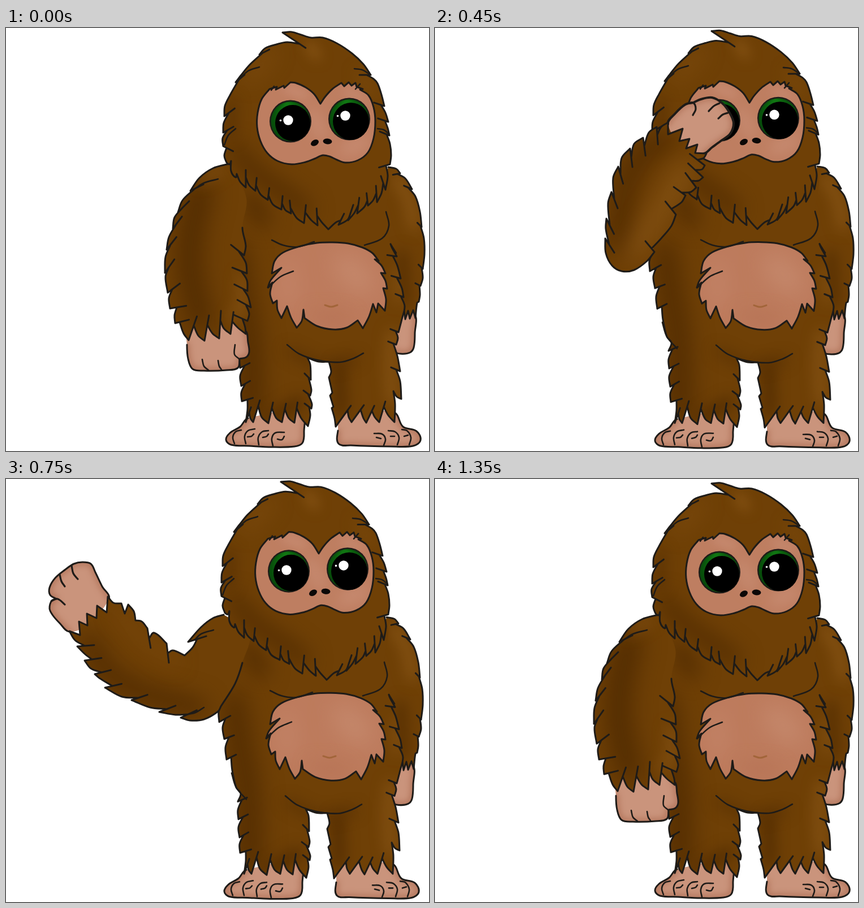
Animation, 748 px wide and 748 px high, one loop 1.5 s. Source, as an HTML page with a canvas:

```html
<!DOCTYPE html>
<html lang="en">
<head>
<meta charset="utf-8">
<title>Waving ape</title>
<style>
html, body { margin: 0; width: 100%; height: 100%; overflow: hidden; background: #fff; }
canvas { display: block; }
</style>
</head>
<body>
<canvas id="stage" width="748" height="748"></canvas>
<script>
const ctx = document.getElementById('stage').getContext('2d');
const INK = '#1e1b18', FUR = '#6f4006', DARK = '#4c2800', LIGHT = '#8f5b1b';
const SKIN = '#ca947c', FACE = '#be7e61', RIM = '#a9694f', GLOW = '#cc927a';

// Points are "x,y"; "!" makes a corner, "-" hides the line that leaves the point.
function outline(spec, closed, tick = 0) {
  const pts = spec.trim().split(/\s+/).map(s => {
    const [x, y] = s.split(',').map(parseFloat);
    return { x, y, sharp: s.includes('!'), hidden: s.includes('-') };
  });
  const n = pts.length;
  const at = i => closed ? pts[(i + n) % n] : pts[Math.max(0, Math.min(n - 1, i))];
  const handle = (i, other, sign) => {
    const p = at(i);
    if (p.sharp) return [p.x + (other.x - p.x) / 3, p.y + (other.y - p.y) / 3];
    const a = at(i - 1), b = at(i + 1);
    const k = sign * Math.hypot(other.x - p.x, other.y - p.y) / 3 / (Math.hypot(b.x - a.x, b.y - a.y) || 1);
    return [p.x + (b.x - a.x) * k, p.y + (b.y - a.y) * k];
  };
  const fill = new Path2D(), line = new Path2D();
  fill.moveTo(pts[0].x, pts[0].y);
  line.moveTo(pts[0].x, pts[0].y);
  for (let i = 0; i < (closed ? n : n - 1); i++) {
    const p = at(i), q = at(i + 1);
    const curve = [...handle(i, q, 1), ...handle(i + 1, p, -1), q.x, q.y];
    fill.bezierCurveTo(...curve);
    if (p.hidden) line.moveTo(q.x, q.y);
    else line.bezierCurveTo(...curve);
  }
  // Between tufts the line runs on into the fur.
  if (tick) pts.forEach((p, i) => {
    const a = at(i - 1), b = at(i + 1);
    const hollow = (p.x - a.x) * (b.y - p.y) < (p.y - a.y) * (b.x - p.x);
    if (!p.sharp || !hollow || a.sharp === b.sharp) return;
    const tip = a.sharp ? a : b;
    const k = tick / Math.hypot(p.x - tip.x, p.y - tip.y);
    line.moveTo(p.x, p.y);
    line.lineTo(p.x + (p.x - tip.x) * k, p.y + (p.y - tip.y) * k);
  });
  return { fill, line };
}

function ink(path, width = 3, color = INK) {
  ctx.lineWidth = width;
  ctx.strokeStyle = color;
  ctx.stroke(path);
}

function lines(list, width = 2.6, color = INK) {
  list.split('|').forEach(s => ink(outline(s).line, width, color));
}

// Only the blurred shadow of the stroke lands on the stage.
function soften(path, width, color, blur) {
  ctx.save();
  const m = ctx.getTransform();
  m.e -= 2000;
  ctx.setTransform(m);
  ctx.shadowOffsetX = 2000;
  ctx.shadowBlur = blur;
  ctx.shadowColor = color;
  ink(path, width, '#000');
  ctx.restore();
}

function part(spec, fill, { tick = 0, rim, soft = [], width = 3 } = {}) {
  const shape = outline(spec, true, tick);
  ctx.fillStyle = fill;
  ctx.fill(shape.fill);
  ctx.save();
  ctx.clip(shape.fill);
  soft.forEach(([s, w, color, blur = 26]) => soften(outline(s).line, w, color, blur));
  if (rim) soften(shape.line, 7, rim, 12);
  ctx.restore();
  ink(shape.line, width);
}

function dot(x, y, rx, ry, color, turn = 0) {
  ctx.fillStyle = color;
  ctx.beginPath();
  ctx.ellipse(x, y, rx, ry, turn, 0, 7);
  ctx.fill();
}

const skin = (spec, width) => part(spec, SKIN, { rim: RIM, width });
const fur = (spec, soft, tick = 17) => part(spec, FUR, { tick, soft });

function drawBody() {
  skin('694,500- 722,505 723,540 721,565 714,574 698,576 688,572-');
  skin('428,690 414,705 396,716 389,728 398,737 430,739 470,741 510,740 524,734 527,715 522,680-');
  skin('594,680- 587,712 588,735 610,738 680,740 720,739 733,729 726,713 702,705 686,680-');
  lines('404,735 401,724 406,714 416,711|424,735 422,722 428,712 440,709|447,737 446,724 453,714 464,712|472,739 470,726 476,716 492,715|427,723 434,722 438,718|454,724 461,722 464,718|480,727 488,728 492,722');
  lines('713,737 716,724 709,712 700,710|692,737 695,724 688,714 676,712|668,738 671,727 665,718 651,717|704,722 711,720|680,722 687,722|655,724 663,726');
  fur(`676,246! 690,249 697,257! 692,258! 706,266 718,285! 711,282! 724,298 732,325 735,352! 733,350!
    739,372 740,400 737,426! 735,424! 737,442 733,456! 731,455! 732,472 730,484! 727,486 724,513! 720,499!
    714,514! 711,500! 706,515! 704,500! 697,508!- 696,480- 690,430- 660,350- 660,300-`,
    [['690,265 712,300 722,350', 14, LIGHT], ['700,400 705,490', 14, DARK]], 8);

  const torso = `400,250- 540,220- 670,250- 672,330- 680,382 691,404! 684,403! 692,420 698,443! 691,441! 700,460
    703,476! 698,474! 705,492 700,515 694,538! 689,536! 693,548 690,560! 685,558! 692,580 697,607! 690,604!
    697,625 699,656! 691,652 685,642! 688,665 687,697! 676,685 668,670! 660,697! 652,688 647,677! 637,698!
    632,690 627,675! 611,697! 606,688 604,676! 583,705! `;
  const legs = `581,690 576,672! 579,670! 573,650! 577,645! 571,618! 575,608 571,590! 553,590 533,583!
    538,595 539,622! 535,618! 540,640 538,650! 534,647! 541,665 540,673! 536,670! 538,685 534,704! 522,690
    514,672! 510,698! 500,690 493,674! 488,697! 478,690 470,672! 464,699! 452,688 446,668! 437,697! 432,690
    430,680! 424,697! 427,675 427,657! 417,660! 416,645 423,629! 416,633! 414,615 422,597! 414,601! 413,585
    420,567! 413,570! 418,556 410,545 403,515 401,492! 393,496! 391,475 397,457! 389,460! 386,440 391,424!
    380,430! 379,412 385,395-`;
  fur(torso + legs, [
    ['405,390 418,480 430,550 435,680', 34, DARK, 44], ['430,300 455,340', 24, DARK, 36],
    ['470,690 520,660', 16, DARK], ['590,600 592,680', 16, DARK],
    ['500,570 560,595 620,585', 8, DARK], ['684,540 680,600 684,660', 13, LIGHT], ['694,430 696,480', 10, LIGHT]
  ], 10);
  part(`578,379 605,381 630,388 648,398 659,412! 652,409! 664,420 671,434! 663,433! 671,447 674,461! 667,460!
    672,480 670,500! 658,487! 655,503! 649,488! 642,510 631,531! 622,517! 602,530 578,533 550,527 528,513!
    526,498! 523,518 514,530! 504,512 497,492! 487,513! 480,498 479,482! 472,487! 467,470 471,450! 463,459!
    468,446 487,424! 470,434! 475,412 490,397 520,386 550,380`, '#bd7b5d',
    { soft: [['600,420 630,450', 40, '#c68a6e', 40], ['500,425 500,480', 24, '#c48569', 36], ['550,510 600,515', 20, '#b67355', 30]] });
  lines('508,430 485,440 464,459|470,375 490,384 515,387 545,378|672,325 677,350 665,372 634,384|680,382 690,398|497,560 518,576 550,587 590,591 615,584 632,575|402,520 410,545 428,566');
  lines('564,490 575,493 586,490', 3, '#a2653a');
}

function drawHead() {
  const crown = `489,8! 505,7 522,12 539,17 560,17 585,27 612,45 632,64 645,83! 638,83! 650,90 657,98 664,118
    669,138! 663,136! 671,150 676,166! 670,164! 675,177 678,190! 673,188! 679,205 681,225 679,241! 672,243! `;
  const beard = `675,262 671,286! 667,274! 664,292 656,308! 655,292! 649,305 640,314! 639,305! 634,316 621,328!
    623,313! 616,327 605,340! 610,325! 604,339 588,348! 592,340! 583,344 570,356! 558,343 550,332! 551,349!
    540,340 529,326! 527,345! 514,336 503,318! 504,328! 494,322 488,310! 487,321! 472,312 464,296! 463,304!
    450,294 442,278! 441,288! 430,278 424,264! 424,282! 414,272 408,258! 406,264 398,253 398,235! 395,241
    390,238! 386,226 390,212! 384,209! 383,195 391,181! 384,185! 385,168 394,150! 386,156! 387,138 396,119
    412,91! 406,96! 416,83 430,66 454,44! 448,47! 458,36 478,29 497,25 519,28!`;
  fur(crown + beard, [
    ['536,30 550,50', 12, LIGHT, 22], ['470,45 430,90', 14, '#7f4d10', 34], ['625,80 650,120', 10, '#7f4d10'],
    ['405,215 440,255 490,290 530,320', 22, DARK, 38], ['400,130 398,190', 10, DARK]
  ], 13);
  lines('448,69 428,76 411,92|645,83 630,74 616,72|406,178 393,190 386,207|677,187 668,180 657,178');

  part(`556,134! 564,122 577,108 593,97! 598,103! 606,96! 611,102! 618,97! 620,104! 631,108! 626,109!
    641,119 650,140 653,165 650,195 640,220 622,234 600,238 585,233 572,227 560,225 546,231 530,237 505,241
    480,235 462,221 450,200 444,175 445,150 452,126 466,108! 479,104! 477,109! 491,102! 492,106! 503,96! 512,97 530,105 545,117`,
    FACE, { soft: [['600,215 635,200', 16, GLOW], ['540,150 560,190', 14, GLOW], ['495,105 530,120', 10, GLOW, 18], ['600,112 630,125', 8, GLOW, 18]] });
  lines('626,99 618,108|474,103 469,110');

  [[503, 165, 507, 168, 31, 499, 163], [607, 161, 610, 165, 32, 600, 155]].forEach(([x, y, px, py, r, hx, hy]) => {
    dot(x, y, 37, 37.5, INK);
    const green = ctx.createRadialGradient(x - 5, y - 30, 3, x, y, 36);
    green.addColorStop(0, '#107512');
    green.addColorStop(1, '#06480a');
    dot(x, y, 34.5, 35, green);
    dot(px, py, r, r + 1, '#000');
    dot(hx, hy, 8.7, 8.7, '#fff');
    dot(hx - 13.5, hy + 0.5, 1.8, 1.8, '#fff');
  });
  dot(546, 203, 7.5, 5, '#0b0807', -0.5);
  dot(568.5, 200.5, 8, 5, '#0b0807', 0.1);
}

const shoulderFur = '312,318! 304,326! 312,305 334,284! 326,288! 342,265 366,248';

function shoulder() {
  fur('395,240!- 425,300- 400,370- 345,350- ' + shoulderFur,
    [['395,255 350,275 320,310', 12, DARK]], 22);
  lines('375,267 350,274 334,284');
}

function armHang() {
  skin('322,530- 320,560 322,585 330,603 350,606 390,605 410,601 413,585! 425,582 430,573 428,556 423,535- 370,510-');
  lines('412,585 404,577 405,560|347,586 350,598 358,605|375,588 377,598 381,604');
  fur(`395,240!- 425,300- 418,353 424,385 421,402! 411,394! 424,415 426,434! 416,430! 426,446 427,465! 419,461!
    428,475 433,494! 424,489! 430,505 427,518! 418,514! 423,530 424,541! 410,530 400,519! 397,541! 385,531
    379,517! 377,549! 365,540 356,525! 351,553! 340,544 332,526! 323,552! 314,540 307,520! 299,522! 298,508
    302,494! 290,496! 288,478 294,462! 286,468! 282,440 288,423! 281,433! 282,405 291,383! 284,392! 288,370
    301,347! 295,355! 298,335 ` + shoulderFur,
    [['345,285 328,360 325,430 345,520', 38, DARK, 44], ['380,250 345,270', 8, LIGHT], ['418,440 416,490 400,515', 10, LIGHT]]);
  lines('375,267 350,274 334,284');
}

function armLow() {
  skin('434,574 444,590 462,606 480,608 497,597 520,583 532,572 530,556 524,550! 532,545 531,530 515,514 490,500- 455,530-');
  lines('508,534 507,544 514,550 524,550|475,578 480,589 490,597|495,570 503,578 514,583');
  fur(`395,240!- 430,290- 419,322 418,345 403,366! 418,378 433,403! 422,400! 440,420 453,437! 444,434! 470,455
    494,470! 481,466! 490,478 496,488! 484,486! 495,500 503,511! 489,505! 487,541! 476,530 470,519! 463,546!
    455,540 450,530! 446,560! 437,552 432,545! 434,574! 410,562 386,540! 390,530! 370,528 358,516! 364,506!
    352,510 343,501! 347,490! 330,480 322,460! 328,452! 312,440 307,420 302,405! 309,396! 300,385 298,362!
    305,354! 299,345 308,325! 302,330! 312,305 334,284! 326,288! 342,265 366,248`,
    [['330,310 328,400 370,480 430,540', 34, DARK, 42], ['430,420 465,465 485,490', 10, LIGHT]]);
  lines('375,267 350,274 334,284');
}

function armChin() {
  skin('520,262- 545,253 570,247 590,246 598,258 598,266! 615,264 629,267 636,285 640,310 643,325 640,345 628,358 600,357 565,354 535,350- 530,300-', 4);
  lines('598,264 594,275 582,280|613,294 625,291 637,294|612,320 626,318 641,320', 3.2);
  fur(`293,370! 300,360 313,338 330,316 355,292 390,268 430,256 475,252 510,254 538,258! 527,268! 541,277!
    528,282! 553,294! 535,304! 552,318! 536,326! 551,338! 538,344! 557,356! 543,368 522,374! 539,381! 520,387
    494,387! 476,398! 455,400 416,406! 431,413! 415,425 398,430 382,431! 367,429! 350,433 325,432 305,414
    293,399! 299,394! 293,385`,
    [['350,335 400,300 460,282 520,275', 32, DARK, 42], ['380,395 450,375 530,360', 16, LIGHT, 34]]);
  lines('338,310 331,325 332,348|370,283 360,297 358,318|400,265 388,280 383,302|425,259 410,273 403,294|447,256 431,270 425,290|470,254 454,266 446,285|492,254 476,264 469,280|513,255 497,264 490,275');
}

function armFace() {
  skin('412,170 424,152 443,135 457,132! 470,126 490,123 508,133 521,150 528,168 522,187 505,200 490,211 475,222- 440,215-', 4);
  lines('443,135 456,132 461,143 456,154|484,147 493,138 503,133|501,160 509,153 518,150', 3.2);
  fur(`412,167! 412,188! 438,178! 432,200! 450,196! 444,213! 464,206! 460,221! 480,222! 475,230 464,233!
    477,243! 472,250 460,251! 474,264! 466,270 453,270! 462,282! 452,290 436,291! 443,296! 436,308 418,320!
    426,330! 418,350 400,372 383,390! 388,396! 375,412 352,428 330,430 313,420 302,398 301,372! 308,383!
    302,355 303,337! 309,349! 306,310 312,290! 317,303! 315,265 324,245! 328,259! 330,230 345,213! 347,229!
    352,205 368,194! 370,209! 378,185 392,175! 393,189! 400,175`,
    [['325,385 335,290 365,225 410,195', 30, DARK, 40], ['350,400 400,320 445,245', 20, LIGHT, 40]]);
}

function armWave() {
  skin('112,270 95,255 82,240 77,229 81,215 89,212! 78,205 77,192 87,175 105,160 120,150 135,147 150,150 158,165 170,190 182,212- 140,260-');
  lines('80,216 91,212 104,222|95,169 98,181 104,190|116,153 119,167 127,177', 3.2);
  fur(`180,208! 190,219 204,220! 210,238! 216,222! 226,234 229,250! 240,252 250,264! 253,282! 262,272 284,291!
    286,308! 295,303 316,312! 330,298 338,283! 322,288! 345,262 366,246 385,240!- 430,270- 418,325 405,362
    380,402! 375,411 350,425 325,427 309,422! 322,416! 300,417 271,412! 284,407! 255,404 222,391! 234,387!
    205,385 175,369! 188,366! 165,352 157,345! 169,342! 150,335 139,321! 152,319! 140,310 126,296! 139,295!
    122,285 112,269! 131,276! 129,252! 144,259! 143,238! 160,246! 161,224! 178,236!`,
    [['145,285 185,345 250,380 340,405', 28, DARK, 40], ['195,235 250,290 300,325', 12, '#7b490d', 34]]);
  lines('367,267 345,274 334,284|350,404 335,413 322,416');
}

function armRaise() {
  ctx.save();
  ctx.translate(330, 400);
  ctx.rotate(0.47);
  ctx.translate(-330, -400);
  armWave();
  ctx.restore();
}

// shift and stretch of the figure, then the arm layers behind, between and in front
const poses = {
  hang: { move: [0, 1, 0], mid: armHang },
  low: { move: [1.5, 1.003, -1], mid: armLow },
  chin: { move: [-0.5, 1.006, -2.6], mid: shoulder, front: armChin },
  face: { move: [0, 1.006, -2.6], front: armFace },
  raise: { move: [2, 1.006, -3.5], back: armRaise, mid: shoulder },
  wave: { move: [-3, 1.006, -3], mid: armWave }
};
const order = 'hang low chin face raise wave chin chin low hang'.split(' ');

function draw({ move: [dx, sy, dy], back, mid, front }) {
  const figure = paint => {
    ctx.setTransform(1, 0, 0, sy, dx, dy);
    paint();
    ctx.setTransform(1, 0, 0, 1, 0, 0);
  };
  ctx.fillStyle = '#fff';
  ctx.fillRect(0, 0, 748, 748);
  back?.();
  figure(drawBody);
  mid?.();
  figure(drawHead);
  front?.();
}

ctx.lineCap = ctx.lineJoin = 'round';
const start = performance.now();
let shown;
function tick() {
  const name = order[Math.floor((performance.now() - start) % 1500 / 150)];
  if (name !== shown) draw(poses[shown = name]);
  requestAnimationFrame(tick);
}
tick();
</script>
</body>
</html>
```
